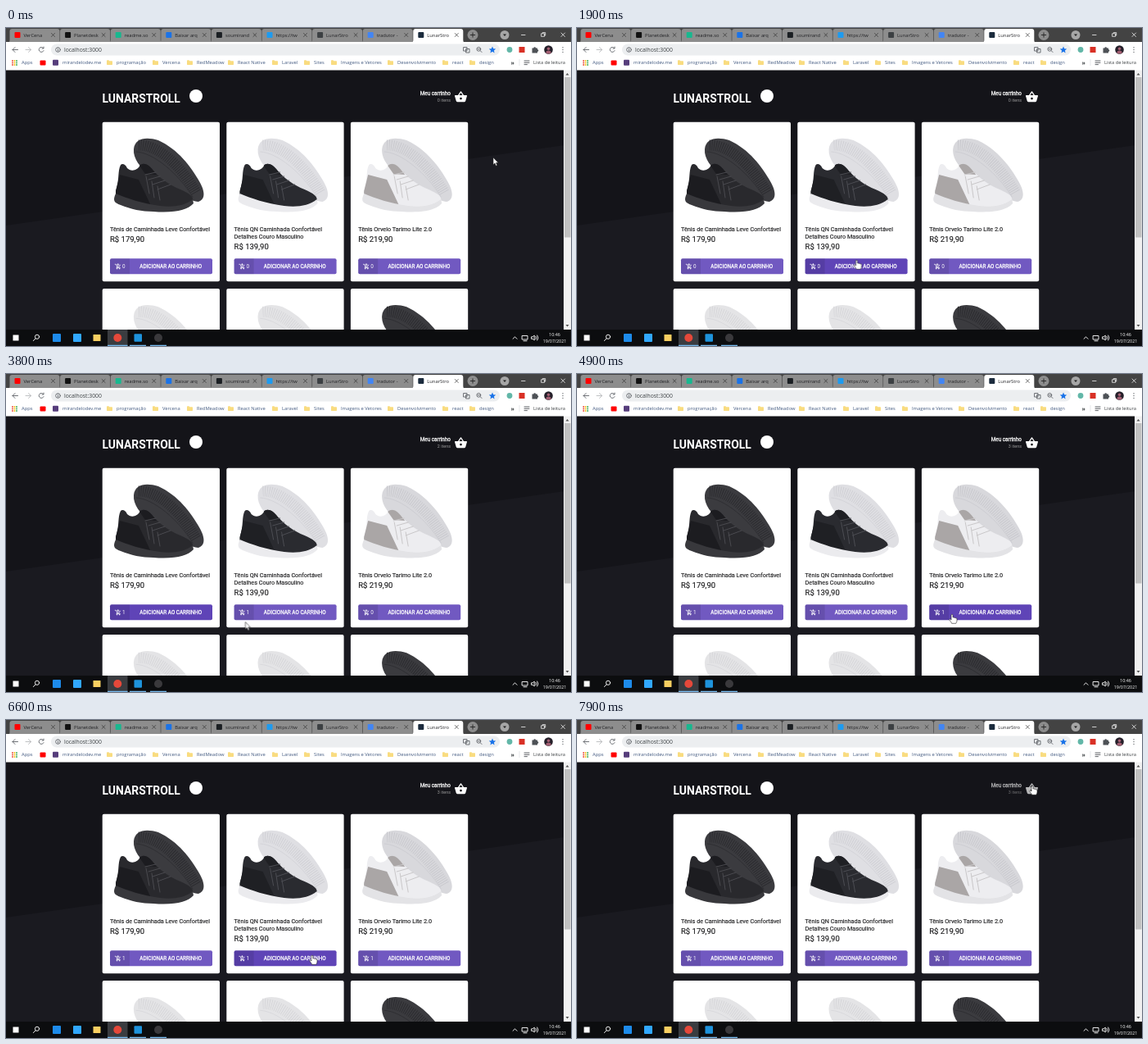
An HTML page for the animation above (8 s loop, 690 by 388 pixels).

```html
<!DOCTYPE html>
<html lang="pt-BR">
<head>
<meta charset="utf-8">
<title>Loja de tênis</title>
<style>
  html, body { margin: 0; width: 100%; height: 100%; overflow: hidden; background: #141419; }
  svg { display: block; width: 690px; height: 388px; }
  .ui { font: 5.8px "Open Sans", "Noto Sans", sans-serif; fill: #3c4043; }
  .marks { fill: #435a80; }
  .page { font: 6.36px Roboto, sans-serif; }
  .strong { stroke: currentColor; stroke-width: .28px; fill: currentColor; }
  .medium { stroke-width: .16px; }
  .line { fill: none; stroke-linecap: round; stroke-linejoin: round; }

  .loop, .step { animation: 8s linear infinite; }
  .step { animation-timing-function: step-end; }
  .before { --from: 1; --to: 0; }

  /* the four clicks */
  .click1 { animation-name: click1; }
  .click2 { animation-name: click2; }
  .click3 { animation-name: click3; }
  .click4 { animation-name: click4; }
  @keyframes click1 { 0% { opacity: var(--from, 0); } 24.4%, to { opacity: var(--to, 1); } }
  @keyframes click2 { 0% { opacity: var(--from, 0); } 38.1%, to { opacity: var(--to, 1); } }
  @keyframes click3 { 0% { opacity: var(--from, 0); } 58.7%, to { opacity: var(--to, 1); } }
  @keyframes click4 { 0% { opacity: var(--from, 0); } 86.2%, to { opacity: var(--to, 1); } }

  .buy { fill: #7159c1; }
  .buy1 { animation-name: buy1; }
  .buy2 { animation-name: buy2; }
  .buy3 { animation-name: buy3; }
  @keyframes buy1 { 0%, 28.7%, 50%, to { fill: #7159c1; } 30.9%, 47.6% { fill: #5f44b7; } }
  @keyframes buy2 {
    0%, 11.9%, 29%, 76.2%, 91.5%, to { fill: #7159c1; }
    13.7%, 26.9%, 78.7%, 89.4% { fill: #5f44b7; }
  }
  @keyframes buy3 { 0%, 53.1%, 74.4%, to { fill: #7159c1; } 55.6%, 72% { fill: #5f44b7; } }

  .basket { animation-name: basket; }
  @keyframes basket { 0%, 94.5% { opacity: 1; } 97%, to { opacity: .7; } }

  .pointer { animation-name: move; }
  @keyframes move {
    0%, 2.5% { transform: translate(595px, 158px); }
    7.5% { transform: translate(500px, 208px); }
    11.3% { transform: translate(378px, 268px); }
    13.7%, 25.6% { transform: translate(341.5px, 283px); }
    28.7% { transform: translate(258px, 299px); }
    31.3%, 34% { transform: translate(225px, 300px); }
    37%, 44.5% { transform: translate(218px, 297px); }
    47.5% { transform: translate(292px, 302.5px); }
    51% { transform: translate(390px, 302px); }
    55%, 69.5% { transform: translate(458px, 293px); }
    73% { transform: translate(425px, 288px); }
    78.7%, 88% { transform: translate(374px, 287px); }
    90% { transform: translate(450px, 240px); }
    94.5%, to { transform: translate(556px, 80px); }
  }
  .hand { animation-name: hand; }
  .arrow { animation-name: arrow; }
  @keyframes hand {
    0%, 27%, 46.5%, 71.6%, 89.2% { opacity: 0; }
    12%, 29.6%, 53.2%, 76.4%, 93.6% { opacity: 1; }
  }
  @keyframes arrow {
    0%, 27%, 46.5%, 71.6%, 89.2% { opacity: 1; }
    12%, 29.6%, 53.2%, 76.4%, 93.6% { opacity: 0; }
  }
</style>
</head>
<body>
<svg viewBox="0 0 690 388">
  <defs>
    <g id="shoe">
      <path fill="var(--back)" d="M38 33C39 20 52 17 68 22C92 33 108 54 118 72C125 84 126 94 117 97C108 97 70 78 58 64C46 56 37 44 38 33Z"/>
      <path class="line" style="stroke-linecap:butt" stroke="var(--tread)" stroke-width="13" stroke-dasharray=".9 1.7" d="M44 28C66 27 94 50 115 87"/>
      <path class="line" stroke="var(--tread)" stroke-width=".7" d="M41 36C62 37 92 62 110 91"/>
      <path fill="var(--upper)" d="M22 52C18 60 21 68 16 84V92L58 104C84 108 100 105 110 96C111 90 106 87 95 82C82 77 70 68 62 59C56 51 50 49 46 52C42 60 34 60 30 56C28 51 24 50 22 52Z"/>
      <path fill="var(--heel)" d="M21 64L44 70L60 104L16 92V84Z"/>
      <path fill="var(--heel)" d="M45 53C50 48 57 52 62 59L66 64L52 63Z"/>
      <path fill="var(--sole)" d="M16 87C12 96 14 98 22 101C34 106 48 109 62 109C88 111 104 107 111 99L110 94C100 102 86 104 70 102C48 99 30 93 16 87Z"/>
      <path class="line" stroke="var(--lace)" stroke-width="1" d="M52 64L65 61M56 70L70 66M61 76L76 71M67 82L83 76M53 66L57 87M60 72L63 92M67 78L70 95"/>
    </g>
    <g id="cart" class="line" stroke="#fff" stroke-width=".75">
      <path d="M.2 1H1.3L2.7 4H5.2L6.4 1.8M2.7 4L1.9 5.2H6.3M3.8 .2V2.7M2.6 1.5H5"/>
      <circle cx="2.4" cy="6.4" r=".35"/><circle cx="5.5" cy="6.4" r=".35"/>
    </g>
    <path id="folder" fill="#f9dc80" d="M0 .6Q0 0 .6 0H2.5L3.3 .9H6.4Q7 .9 7 1.5V5Q7 5.6 6.4 5.6H.6Q0 5.6 0 5Z"/>
    <clipPath id="view"><path d="M0 51H682V368H0Z"/></clipPath>
  </defs>

  <!-- page -->
  <g class="page" clip-path="url(#view)">
    <path fill="#141419" d="M0 51H682V368H0Z"/>
    <path fill="#1a1a20" d="M0 241L682 143V368H0Z"/>
    <text x="117.5" y="91" fill="#fff" font-size="13.9" font-weight="700">LUNARSTROLL</text>
    <circle cx="232" cy="83" r="8" fill="#fff"/>
    <g class="loop basket" text-anchor="end">
      <text x="543" y="82.4" class="strong" color="#fff">Meu carrinho</text>
      <g font-size="5.45" fill="#999">
        <text x="543" y="90" class="step before click1">0 itens</text>
        <g class="step click1"><text x="543" y="90" class="step before click2">1 item</text></g>
        <g class="step click2"><text x="543" y="90" class="step before click3">2 itens</text></g>
        <text x="543" y="90" class="step click3">3 itens</text>
      </g>
      <path transform="translate(547.3 75.8) scale(.683)" fill="#fff" d="M17.2 9L12.8 2.4Q12 1.6 11.2 2.4L6.8 9H2Q1 9 1 10.2L3.6 19.5Q4 21 5.5 21H18.5Q20 21 20.4 19.5L23 10.2Q23 9 22 9ZM9 9L12 4.6L15 9ZM12 17A2 2 0 1 1 12 13A2 2 0 1 1 12 17Z"/>
    </g>
    <g id="cards"></g>
  </g>

  <!-- scrollbar -->
  <path fill="#f1f1f1" d="M681 51H690V368H681Z"/>
  <path fill="#c1c1c1" d="M682 60H689.5V255.5H682Z"/>
  <path fill="#505050" d="M683.5 57.5H687.5L685.5 55ZM683.5 362H687.5L685.5 364.5Z"/>

  <!-- browser -->
  <g class="ui">
    <path fill="#434343" d="M0 0H690V18H0Z"/>
    <g id="tabs"></g>
    <circle cx="570" cy="8.5" r="6.5" fill="#8d8d8d"/>
    <path class="line" stroke="#222" stroke-width=".9" d="M567.3 8.5H572.7M570 5.8V11.2"/>
    <circle cx="609" cy="8.5" r="5.5" fill="#a6a6a6"/>
    <path fill="#222" d="M607 7.5H611L609 10Z"/>
    <path class="line" stroke="#f2f2f2" stroke-width=".8" d="M629.5 8.5H634M654 6.8H657.5V10.3H654ZM655.2 6.5V5.6H658.7V9.1H658M678 6L682.5 10.5M682.5 6L678 10.5"/>

    <path fill="#fff" d="M0 17H690V51.5H0Z"/>
    <rect x="55" y="19.5" width="548" height="14" rx="7" fill="#eceef0"/>
    <g class="line" stroke="#5f6368" stroke-width=".9">
      <path d="M14.5 26.5H8M11 23.5L8 26.5L11 29.5"/>
      <path stroke="#b9bbbe" d="M24 26.5H30.5M27.5 23.5L30.5 26.5L27.5 29.5"/>
      <path d="M45.5 24.4A3 3 0 1 0 46 27.6M46 23V25H44"/>
      <circle cx="63.5" cy="26.5" r="2.8"/><path d="M63.5 26.3V28M63.5 24.9V25"/>
      <path d="M559 23.5H563V28H559ZM562 25.5H566V30H562Z"/>
      <circle cx="577.3" cy="25.8" r="2.4"/><path d="M579.2 27.7L581 29.5M576.2 25.8H578.4"/>
    </g>
    <text x="71" y="29" font-size="6.8">localhost:3000</text>
    <path fill="#1a73e8" d="M594 22.4L595.2 25.2L598.2 25.5L595.9 27.4L596.6 30.4L594 28.8L591.4 30.4L592.1 27.4L589.8 25.5L592.8 25.2Z"/>
    <circle cx="615" cy="26.5" r="3.4" fill="#62b7a8"/>
    <path fill="#d93025" d="M626.5 23H633.5V30H626.5Z"/>
    <path fill="#4d5156" d="M642.5 24.5H644.4A1.3 1.3 0 0 1 647 24.5H649V26.2A1.3 1.3 0 0 1 649 28.8V30.5H642.5Z"/>
    <circle cx="662.5" cy="26.5" r="5.3" fill="#25202a"/>
    <path fill="#a35f72" d="M659.2 30.5Q659.5 27.6 662.5 27.6T665.8 30.5Q662.5 32.5 659.2 30.5Z"/>
    <circle cx="662.5" cy="25.3" r="1.8" fill="#a35f72"/>
    <path class="line" stroke="#5f6368" stroke-width="1.3" d="M680 23.7V23.8M680 26.5V26.6M680 29.3V29.4"/>

    <g class="marks">
      <g id="apps"></g>
      <text x="19" y="44.3">Apps</text>
      <rect x="41.5" y="39.5" width="7" height="6" rx="1" fill="#f00"/>
      <rect x="57" y="38.8" width="7" height="7" rx="1" fill="#563d7c"/>
      <text x="69" y="44.3">mirandelodev.me</text>
      <g id="marks"></g>
    </g>
    <text x="616.5" y="44.5" font-size="7" font-weight="700">»</text>
    <path stroke="#d5d7da" stroke-width=".6" d="M627 38V46"/>
    <path class="line" stroke="#4d5156" stroke-width=".9" d="M633 40H639M633 42.3H639M633 44.6H636.5"/>
    <text x="644" y="44.3" font-size="5.7">Lista de leitura</text>
  </g>

  <!-- taskbar -->
  <g class="ui">
    <path fill="#0c0d0f" d="M0 368H690V388H0Z"/>
    <path fill="#3a3c40" d="M124 368H148.5V388H124Z"/>
    <path fill="#76b9ed" d="M124 386.8H148.5V388H124ZM151 386.8H171V388H151ZM176 386.8H196V388H176Z"/>
    <rect x="8.5" y="374.5" width="7" height="7" fill="#fff"/>
    <g class="line" stroke="#fff" stroke-width=".9">
      <circle cx="38" cy="376.8" r="2.6"/><path d="M36 378.8L33.4 381.6"/>
      <path d="M619 379.3L621.5 376.8L624 379.3M630.5 375.5H637V380H630.5ZM632 381.8H636M642 376.8H643.3L645.2 375V381L643.3 379.3H642ZM647 376.3Q648.3 378 647 379.8M648.8 375Q651 378 648.8 381"/>
    </g>
    <rect x="57" y="373" width="10" height="10" rx="1" fill="#1d8bea"/>
    <rect x="82" y="373" width="10" height="10" rx="1" fill="#31a8ff"/>
    <rect x="106.5" y="374" width="9" height="8" rx=".6" fill="#f8cf61"/>
    <circle cx="136.3" cy="378" r="5" fill="#e5483a"/>
    <rect x="156.5" y="373.3" width="9.5" height="9.5" rx="1" fill="#1e93dc"/>
    <circle cx="186" cy="378" r="5" fill="#3a393c"/>
    <g fill="#fff" text-anchor="middle" font-size="5.4">
      <text x="670" y="375.6">10:46</text>
      <text x="670" y="384.2">19/07/2021</text>
    </g>
  </g>

  <g class="loop pointer" stroke="#222" stroke-width=".6" stroke-linejoin="round" fill="#fff">
    <path class="step arrow" d="M0 0V8.8L2 7L3.4 10.2L4.9 9.5L3.5 6.5H6.2Z"/>
    <path class="step hand" d="M-1 .8Q0 -.6 1 .8V4Q2 3.2 2.8 4.4Q3.8 3.7 4.4 4.9Q6 4.4 6 6V8Q6 9.5 4.8 11.3H-.4Q-1 9.6 -3 7.3Q-3.7 6 -2.5 5.8L-1 7Z"/>
  </g>
</svg>

<script>
const fill = (id, items, draw) =>
  document.getElementById(id).innerHTML = items.map(draw).join('');

const tabs = [
  ['VerCena', '#f00'], ['Planetdesk', '#111'], ['readme.so', '#18b88f'],
  ['Baixar arq', '#1a73e8'], ['soumirand', '#1b1f23'], ['https://tw', '#1d9bf0'],
  ['LunarStro', '#3c4043'], ['tradutor -', '#4285f4'], ['LunarStro', '#1b2b3d']
];
fill('tabs', tabs, ([title, color], i) => {
  const x = 4.5 + i * 61.6, active = i === 8;
  return `<path fill="${active ? '#fff' : '#8d8d8d'}" d="M${x - 1.5} 18Q${x} 17 ${x} 15V4Q${x} 1 ${x + 3} 1H${x + 58}Q${x + 61} 1 ${x + 61} 4V15Q${x + 61} 17 ${x + 62.5} 18Z"/>
    <rect x="${x + 6}" y="5" width="7" height="7" rx="1" fill="${color}"/>
    <text x="${x + 17}" y="10.8" fill="#202124">${title}</text>
    <path class="line" stroke="#333" stroke-width=".7" d="M${x + 51} 6.5l4 4m0 -4l-4 4"/>`;
});

const dots = ['#ea4335', '#fbbc04', '#34a853', '#4285f4'];
fill('apps', [...Array(9).keys()], i =>
  `<circle cx="${8 + i % 3 * 2.5}" cy="${40 + (i / 3 | 0) * 2.5}" r=".9" fill="${dots[(i + (i / 3 | 0)) % 4]}"/>`);

const marks = [
  [123, 'programação'], [179, 'Vercena'], [221, 'RedMeadow'], [271, 'React Native'],
  [325, 'Laravel'], [364, 'Sites'], [397, 'Imagens e Vetores'],
  [466, 'Desenvolvimento'], [533, 'react'], [566, 'design']
];
fill('marks', marks, ([x, name]) =>
  `<use href="#folder" x="${x}" y="39.3"/><text x="${x + 12}" y="44.3">${name}</text>`);

const parts = ['upper', 'sole', 'back', 'tread', 'heel', 'lace'];
const black = ['#29292d', '#38383c', '#3b3b3f', '#2a2a2e', '#1c1c20', '#4a4a4f'];
const mixed = ['#2a2b30', '#ebebee', '#dfdfe3', '#cfcfd4', '#1f2024', '#4c4d53'];
const grey = ['#ededf0', '#e3e3e6', '#d8d8dc', '#c8c8cd', '#aaa6a6', '#c9c7c9'];
const white = ['#ededed', '#e8e8e8', '#e4e4e6', '#d5d5d8', '#e2e2e4', '#f8f8f8'];

const count = (n, cls) => `<text x="24" y="178.2" fill="#fff" class="${cls}">${n}</text>`;
const cards = [
  { shoe: black, title: ['Tênis de Caminhada Leve Confortável'], price: '179,90',
    counts: count(0, 'step before click2') + count(1, 'step click2') },
  { shoe: mixed, title: ['Tênis QN Caminhada Confortável', 'Detalhes Couro Masculino'], price: '139,90',
    counts: count(0, 'step before click1') + `<g class="step click1">${count(1, 'step before click4')}</g>` + count(2, 'step click4') },
  { shoe: grey, title: ['Tênis Orvelo Tarimo Lite 2.0'], price: '219,90',
    counts: count(0, 'step before click3') + count(1, 'step click3') },
  { shoe: white }, { shoe: white }, { shoe: black }
];

const details = ({ title, price, counts }, i) => `
  <g class="strong medium" color="#1d1d1f">
    ${title.map((line, n) => `<text x="9" y="${132.5 + n * 9.1}" font-size="7.27">${line}</text>`).join('')}
    <text x="9" y="${136.8 + title.length * 9.1}" font-size="9.5">R$ ${price}</text>
  </g>
  <rect class="loop buy buy${i + 1}" x="9" y="166.3" width="125" height="19" rx="2"/>
  <path fill="#000" fill-opacity=".1" d="M11 166.3H33V185.3H11Q9 185.3 9 183.3V168.3Q9 166.3 11 166.3Z"/>
  <use href="#cart" x="15" y="172.3"/>${counts}
  <text class="strong" color="#fff" x="83.2" y="178.2" text-anchor="middle">ADICIONAR AO CARRINHO</text>`;

fill('cards', cards, (card, i) => {
  const x = 118 + i % 3 * 151.6, y = 115 + (i / 3 | 0) * 203.3;
  const tones = parts.map((p, n) => `--${p}:${card.shoe[n]}`).join(';');
  return `<g transform="translate(${x} ${y})">
    <rect x="-.3" y="-.3" width="143.3" height="194.5" rx="2" fill="#fff"/>
    <use href="#shoe" style="${tones}"/>${card.title ? details(card, i) : ''}</g>`;
});
</script>
</body>
</html>
```
